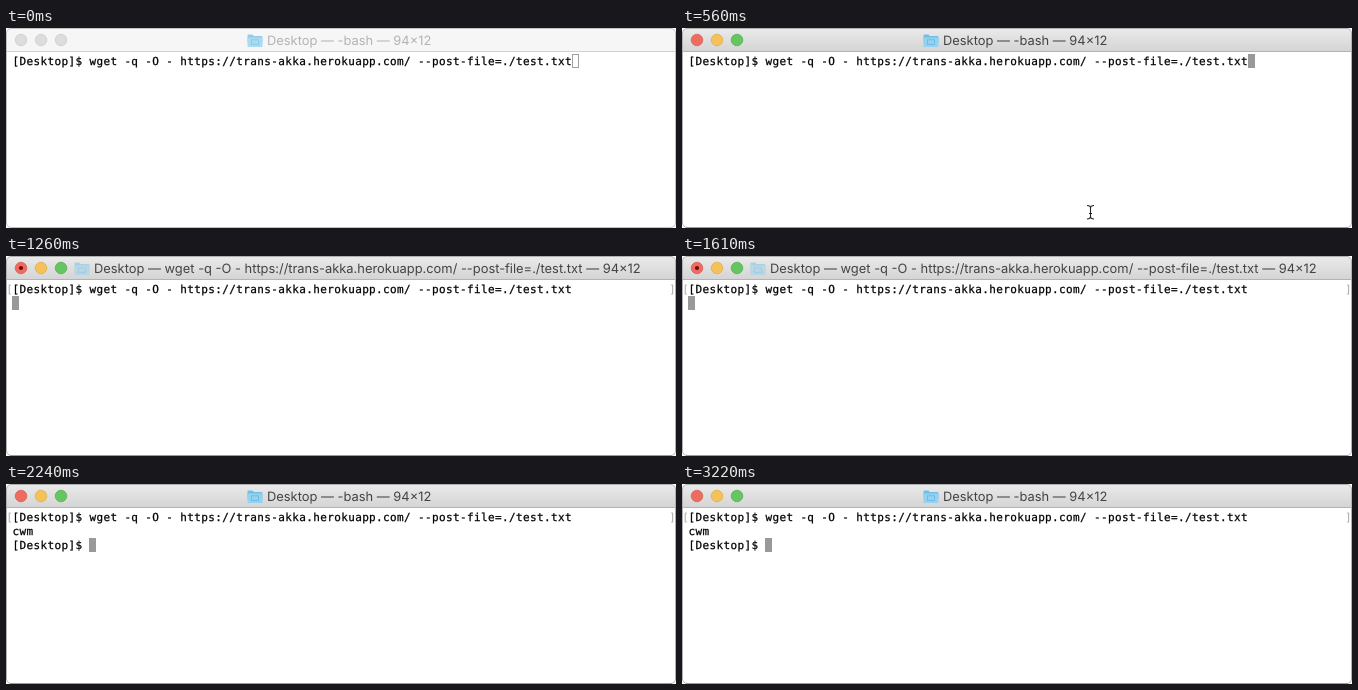
Write an HTML page that moves like this. It is 670 px wide and 200 px high and loops after 3500 ms.

```html
<!DOCTYPE html>
<html lang="en">
<head>
<meta charset="utf-8">
<title>Terminal</title>
<style>
  html, body { margin: 0; width: 100%; height: 100%; overflow: hidden; background: #fff; }
  svg { display: block; width: 670px; height: 200px; }
  text { white-space: pre; text-rendering: geometricPrecision; }
  .title { font: 12.9px Inter, "Liberation Sans", sans-serif; fill: #434343; }
  .idle .title { fill: #b3b3b3; }
  .term {
    font: 11px "DejaVu Sans Mono", "Liberation Mono", monospace;
    letter-spacing: 0.37px; fill: #000; stroke: #000; stroke-width: 0.25px;
  }
  .mark { fill: #a9a9a9; stroke: none; }
  .block { fill: #999; }
</style>
</head>
<body>
<svg viewBox="0 0 670 200" xmlns="http://www.w3.org/2000/svg">
  <defs>
    <linearGradient id="bar" x1="0" y1="0" x2="0" y2="1">
      <stop offset="0" stop-color="#eaeaea"/>
      <stop offset="1" stop-color="#d4d4d4"/>
    </linearGradient>
    <g id="folder">
      <path d="M0.5 8.5V1.8Q0.5 0.5 1.8 0.5H5.3L6.8 2H14.2Q15.5 2 15.5 3.3V8.5Z" fill="#72bfe4"/>
      <rect x="0.5" y="3.6" width="15" height="9.4" rx="1" fill="#93d2f0"/>
      <rect x="4.5" y="5.8" width="7" height="4.6" fill="none" stroke="#6fb9de" stroke-width="0.9"/>
    </g>
    <path id="barShape" d="M0.5 23.5V5.5Q0.5 0.5 5.5 0.5H664.5Q669.5 0.5 669.5 5.5V23.5Z"/>
    <rect id="frame" x="0.5" y="0.5" width="669" height="199" rx="4.5" fill="none"/>
  </defs>

  <g id="idle" class="idle">
    <use href="#barShape" fill="#f6f6f6"/>
    <path d="M1 23.5H669" stroke="#d0d0d0"/>
    <use href="#frame" stroke="#c2c2c2"/>
    <g fill="#dcdcdc" stroke="#cdcdcd" stroke-width="0.8">
      <circle cx="15" cy="12" r="5.8"/>
      <circle cx="35" cy="12" r="5.8"/>
      <circle cx="55" cy="12" r="5.8"/>
    </g>
    <use href="#folder" x="241" y="6" opacity="0.75"/>
    <text class="title" x="261" y="17">Desktop — -bash — 94×12</text>
  </g>

  <g id="active">
    <use href="#barShape" fill="url(#bar)"/>
    <path d="M1 23.5H669" stroke="#b3b3b3"/>
    <use href="#frame" stroke="#b0b0b0"/>
    <path d="M4 199.5H666" stroke="#999"/>
    <g stroke-width="0.8">
      <circle cx="15" cy="12" r="5.8" fill="#ee6b60" stroke="#db6158"/>
      <circle cx="35" cy="12" r="5.8" fill="#f5c25a" stroke="#deb050"/>
      <circle cx="55" cy="12" r="5.8" fill="#64c561" stroke="#58b256"/>
    </g>
  </g>
  <g id="bashTitle">
    <use href="#folder" x="241" y="6"/>
    <text class="title" x="261" y="17">Desktop — -bash — 94×12</text>
  </g>
  <g id="wgetTitle">
    <circle cx="15" cy="12" r="2.1" fill="#6d0d0a"/>
    <use href="#folder" x="68" y="6" opacity="0.5"/>
    <text class="title" x="88" y="17">Desktop — wget -q -O - https://trans-akka.herokuapp.com/ --post-file=./test.txt — 94×12</text>
  </g>

  <text class="term" x="6.5" y="37">[Desktop]$ wget -q -O - https://trans-akka.herokuapp.com/ --post-file=./test.txt</text>
  <rect id="hollow" x="566.5" y="26.5" width="6" height="13" fill="none" stroke="#a0a0a0"/>
  <rect id="cursor1" class="block" x="566" y="26" width="7" height="14"/>
  <rect id="cursor2" class="block" x="6" y="40" width="7" height="14"/>
  <g id="marks">
    <text class="term mark" x="0.3" y="37">[</text>
    <text class="term mark" x="663" y="37">]</text>
  </g>
  <g id="output">
    <text class="term" x="6.5" y="51">cwm</text>
    <text class="term" x="6.5" y="65">[Desktop]$</text>
    <rect class="block" x="83" y="54" width="7" height="14"/>
  </g>

  <path id="arrow" d="M408.8 184.3V196.4L411.6 193.8L413.6 198.4L415.6 197.5L413.6 193.1H417.3Z"
        fill="#000" stroke="#fff" stroke-width="1" paint-order="stroke"/>
  <path id="beam" d="M405 177.5Q408.5 177.5 408.5 180V188.5Q408.5 191 405 191M412 177.5Q408.5 177.5 408.5 180M408.5 188.5Q408.5 191 412 191M407 185.5H410"
        fill="none" stroke="#222" stroke-width="1.1"/>
</svg>
<script>
  const LOOP = 3500;
  // Visible spans in ms: id -> [from, to] pairs
  const spans = {
    idle: [[0, 560]],
    hollow: [[0, 560]],
    arrow: [[350, 560]],
    active: [[560, LOOP]],
    beam: [[560, 1050]],
    cursor1: [[560, 1050]],
    marks: [[1050, LOOP]],
    cursor2: [[1050, 2100]],
    bashTitle: [[560, 1260], [2170, LOOP]],
    wgetTitle: [[1260, 2170]],
    output: [[2100, LOOP]]
  };
  const parts = Object.entries(spans).map(([id, list]) => [document.getElementById(id), list]);
  const start = performance.now();

  function draw(now) {
    const t = Math.max(0, now - start) % LOOP;
    for (const [el, list] of parts) {
      const on = list.some(([from, to]) => t >= from && t < to);
      el.style.visibility = on ? "visible" : "hidden";
    }
    requestAnimationFrame(draw);
  }
  draw(start);
</script>
</body>
</html>
```
